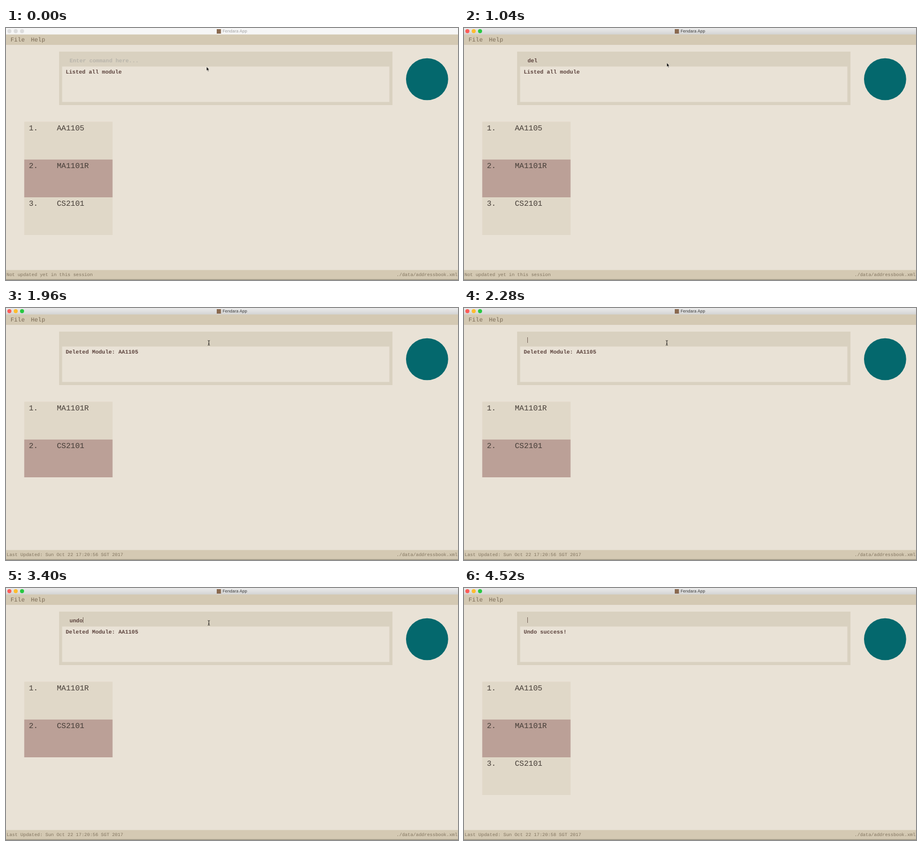
An HTML page for the animation above (4.56 s loop, 800x448 px).

```html
<!DOCTYPE html>
<html lang="en">
<head>
<meta charset="utf-8">
<title>Module list</title>
<style>
  html, body { margin: 0; width: 100%; height: 100%; overflow: hidden; background: #e9e2d6; }
  body { position: relative; font-family: "Liberation Mono", "Courier New", monospace; text-rendering: geometricPrecision; }
  svg { display: block; position: absolute; left: 0; top: 0; }
  text { white-space: pre; }

  .title { font: 7.6px "Liberation Sans", Arial, sans-serif; }
  .menu { font-size: 10.5px; fill: #7a6a55; }
  .bold, .command { font-size: 9.73px; font-weight: bold; }
  .bold { fill: #5c433d; }
  .prompt { fill: #b9b5ab; }
  .item { font-size: 13.5px; fill: #443c36; }
  .status { font-size: 8.2px; fill: #827560; }
  .card { fill: #e0d8c8; }
  .picked { fill: #bba097; }

  /* One loop: focus at 240 ms, first Enter at 1800 ms, second at 3640 ms. */
  .idle, .active, .start, .deleted, .undone, .full, .arrow, .beam, .caret {
    animation: 4560ms step-end infinite;
  }
  .idle { animation-name: idle; }
  .active { animation-name: active; }
  .start { animation-name: start; }
  .deleted { animation-name: deleted; }
  .undone { animation-name: undone; }
  .full { animation-name: full; }
  .arrow { animation-name: arrow; }
  .beam { animation-name: beam; }
  .pointer { animation: pointer 4560ms linear infinite; }

  @keyframes idle { 0% { opacity: 1 } 5.263%, 100% { opacity: 0 } }
  @keyframes active { 0% { opacity: 0 } 5.263%, 100% { opacity: 1 } }
  @keyframes start { 0% { opacity: 1 } 39.474%, 100% { opacity: 0 } }
  @keyframes deleted { 0% { opacity: 0 } 39.474% { opacity: 1 } 79.825%, 100% { opacity: 0 } }
  @keyframes undone { 0% { opacity: 0 } 79.825%, 100% { opacity: 1 } }
  @keyframes full { 0% { opacity: 1 } 39.474% { opacity: 0 } 79.825%, 100% { opacity: 1 } }
  @keyframes arrow { 0% { opacity: 1 } 39.474% { opacity: 0 } 88.5%, 100% { opacity: 1 } }
  @keyframes beam { 0% { opacity: 0 } 39.474% { opacity: 1 } 88.5%, 100% { opacity: 0 } }
  @keyframes pointer {
    0% { transform: translate(355px, 69px) }
    4.386%, 81.14% { transform: translate(359px, 62px) }
    85.965% { transform: translate(337px, 62px) }
    95.614%, 100% { transform: translate(300px, -15px) }
  }

  .command {
    position: absolute; left: 112.4px; top: 52px; height: 12px; line-height: 14px;
    display: flex; color: #5c433d; white-space: pre;
  }
  .command span { width: 0; overflow: hidden; animation: 4560ms step-end infinite; }
  .command .first { animation-name: first; }
  .command .second { animation-name: second; }
  @keyframes first {
    0% { width: 0 }
    14.912% { width: 0; animation-timing-function: steps(8) }
    32.895% { width: 8ch }
    39.474%, 100% { width: 0 }
  }
  @keyframes second {
    0% { width: 0 }
    59.649% { width: 0; animation-timing-function: steps(4) }
    71.93% { width: 4ch }
    79.825%, 100% { width: 0 }
  }
  .caret { width: 1px; height: 10px; background: #7b695e; animation-name: blink; }
  /* half a second on, half a second off */
  @keyframes blink {
    0% { opacity: 0 } 5.263% { opacity: 1 }
    15.351% { opacity: 0 } 26.316% { opacity: 1 }
    37.281% { opacity: 0 } 48.246% { opacity: 1 }
    59.211% { opacity: 0 } 70.175% { opacity: 1 }
    81.14% { opacity: 0 } 92.105%, 100% { opacity: 1 }
  }
</style>
</head>
<body>
<svg width="800" height="448" viewBox="0 0 800 448">
  <linearGradient id="bar" x2="0" y2="1">
    <stop stop-color="#ebebeb"/><stop offset="1" stop-color="#d3d3d3"/>
  </linearGradient>
  <rect width="800" height="448" fill="#e9e2d6"/>

  <!-- title bar -->
  <rect width="800" height="12" fill="#f6f6f6"/>
  <g class="idle">
    <g fill="#dcdcdc">
      <circle cx="6" cy="5.6" r="3.6"/><circle cx="17.2" cy="5.6" r="3.6"/><circle cx="28.4" cy="5.6" r="3.6"/>
    </g>
    <text class="title" x="383.2" y="8.4" fill="#a3a3a3">Fendara App</text>
  </g>
  <g class="active">
    <rect width="800" height="12" fill="url(#bar)"/>
    <circle cx="6" cy="5.6" r="3.6" fill="#fc5b57"/>
    <circle cx="17.2" cy="5.6" r="3.6" fill="#fdbc2e"/>
    <circle cx="28.4" cy="5.6" r="3.6" fill="#28c840"/>
    <text class="title" x="383.2" y="8.4" fill="#3c3c3c">Fendara App</text>
  </g>
  <rect x="373" y="2" width="7.5" height="8" fill="#8a6a50"/>

  <!-- menu bar -->
  <rect y="11.5" width="800" height="18.5" fill="#d4c9b3"/>
  <text class="menu" x="8" y="24.3">File</text>
  <text class="menu" x="44" y="24.3">Help</text>

  <!-- command box and result -->
  <rect x="94" y="42" width="590" height="95" fill="#d9d1c0"/>
  <rect x="99.3" y="68.5" width="579.2" height="63" fill="#e9e2d6"/>
  <text class="bold prompt idle" x="112.4" y="61.3">Enter command here...</text>
  <text class="bold start" x="105.7" y="80.7">Listed all module</text>
  <text class="bold deleted" x="105.7" y="80.7">Deleted Module: AA1105</text>
  <text class="bold undone" x="105.7" y="80.7">Undo success!</text>

  <circle cx="745.3" cy="91" r="37.3" fill="#04686d"/>

  <!-- module list -->
  <rect class="card" x="32.3" y="166.6" width="156.3" height="67.2"/>
  <rect class="picked" x="32.3" y="233.8" width="156.3" height="67.2"/>
  <g class="item">
    <text x="40.5" y="181.5">1.</text>
    <text x="40.5" y="248.6">2.</text>
    <g class="full">
      <rect class="card" x="32.3" y="301" width="156.3" height="67"/>
      <text x="90" y="181.5">AA1105</text>
      <text x="90" y="248.6">MA1101R</text>
      <text x="40.5" y="315.7">3.</text>
      <text x="90" y="315.7">CS2101</text>
    </g>
    <g class="deleted">
      <text x="90" y="181.5">MA1101R</text>
      <text x="90" y="248.6">CS2101</text>
    </g>
  </g>

  <!-- status bar -->
  <rect y="430.3" width="800" height="17" fill="#d4c9b3"/>
  <rect y="446.6" width="800" height="1.4" fill="#9c9583"/>
  <g class="status">
    <text class="start" x="1" y="441">Not updated yet in this session</text>
    <text class="deleted" x="1" y="441">Last Updated: Sun Oct 22 17:20:56 SGT 2017</text>
    <text class="undone" x="1" y="441">Last Updated: Sun Oct 22 17:20:58 SGT 2017</text>
    <text x="799.2" y="441" text-anchor="end">./data/addressbook.xml</text>
  </g>
</svg>

<div class="command"><span class="first">delete 1</span><span class="second">undo</span><i class="caret"></i></div>

<svg width="800" height="448" viewBox="0 0 800 448">
  <g class="pointer">
    <path class="arrow" d="M0 0V7L1.5 5.6L2.7 8.3L3.8 7.8L2.6 5.2H4.6Z" fill="#000" stroke="#f4f0e8" stroke-width=".5"/>
    <path class="beam" d="M-1.8 -4.2Q0 -4.2 0 -3Q0 -4.2 1.8 -4.2M0 -3V3M-1.8 4.2Q0 4.2 0 3Q0 4.2 1.8 4.2M-1 1.2H1" fill="none" stroke="#1c1a18" stroke-width=".9"/>
  </g>
</svg>
</body>
</html>
```
